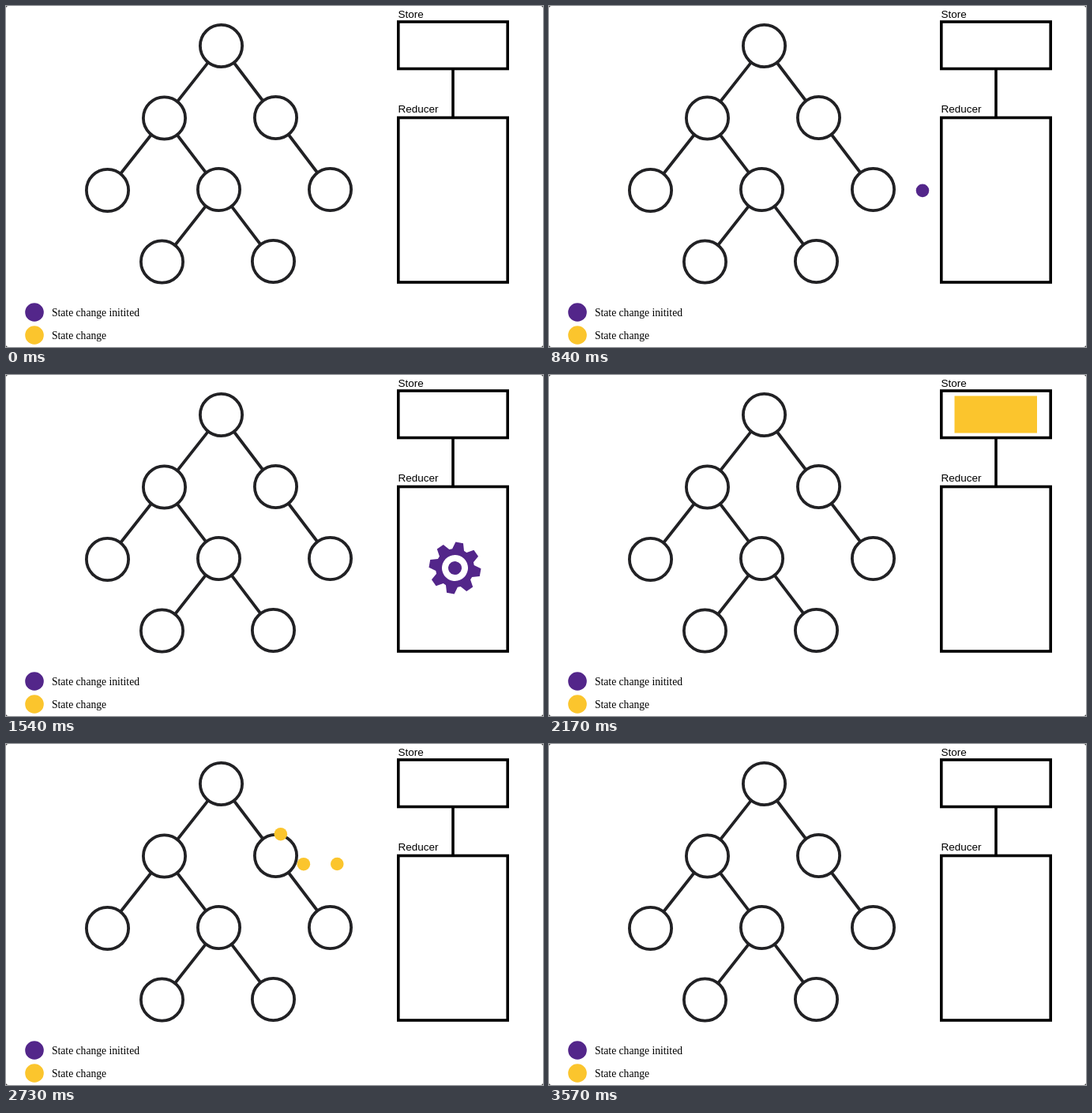
An HTML page for the animation above (3780 ms loop, 680 by 432 pixels).

```html
<!DOCTYPE html>
<html lang="en">
<head>
<meta charset="utf-8">
<style>
  html, body { margin: 0; width: 100%; height: 100%; overflow: hidden; background: #222; }
  svg { display: block; background: #fff; border-radius: 3px; }
  .tree { stroke: #212124; stroke-width: 3.8; fill: #fff; }
  .box { stroke: #000; stroke-width: 3.6; fill: none; }
  .label { font: 13.5px "Liberation Sans", Arial, sans-serif; }
  .legend { font: 13.6px "Liberation Serif", Times, serif; }
  .purple { fill: #53268a; }
  .yellow { fill: #fbc52d; }
</style>
</head>
<body>
<svg width="680" height="432" viewBox="0 0 680 432">
  <g id="tree" class="tree"></g>
  <g class="box">
    <path d="M566 80V141"/>
    <rect x="496.8" y="20" width="138.4" height="59.5"/>
    <rect x="496.8" y="141.5" width="138.4" height="208.5"/>
  </g>
  <g class="label">
    <text x="496.5" y="15">Store</text>
    <text x="496.5" y="135">Reducer</text>
  </g>
  <g class="legend">
    <circle class="purple" cx="36" cy="388" r="11.8"/>
    <circle class="yellow" cx="36" cy="417" r="11.8"/>
    <text x="58" y="393">State change initited</text>
    <text x="58" y="422">State change</text>
  </g>
  <g id="gear">
    <path id="cog" class="purple"/>
    <circle r="16.5" fill="#fff"/>
    <circle class="purple" r="8.5"/>
  </g>
  <rect id="fill" class="yellow" x="513.5" y="26.5" width="104.5" height="47"/>
  <g id="dots"></g>
</svg>
<script>
const STEP = 70, LOOP = 3780;
const $ = id => document.getElementById(id);

function add(parent, tag, attrs) {
  const el = document.createElementNS('http://www.w3.org/2000/svg', tag);
  for (const key in attrs) el.setAttribute(key, attrs[key]);
  return parent.appendChild(el);
}

const nodes = [
  [272.5, 50.5], [200.5, 142], [341.5, 141.5], [128.5, 233.5],
  [269.5, 232.5], [410.5, 232.5], [197.5, 324], [338.5, 323.5]
];
const edges = [[0, 1], [0, 2], [1, 3], [1, 4], [2, 5], [4, 6], [4, 7]];
for (const [a, b] of edges) add($('tree'), 'path', { d: `M${nodes[a]}L${nodes[b]}` });
for (const [cx, cy] of nodes) add($('tree'), 'circle', { cx, cy, r: 26.6 });

// Eight tapered teeth: root, tip, tip, root
const outline = [];
for (let i = 0; i < 8; i++) {
  for (const [offset, r] of [[-18, 24.5], [-8.5, 33], [8.5, 33], [18, 24.5]]) {
    const a = (i * 45 + offset) * Math.PI / 180;
    outline.push([r * Math.sin(a), -r * Math.cos(a)]);
  }
}
$('cog').setAttribute('d', `M${outline.join('L')}Z`);

const makeDot = (color, start, end, from, to) =>
  ({ el: add($('dots'), 'circle', { class: color, r: 8.3 }), start, end, from, to });
const dots = [
  makeDot('purple', 140, 980, [410.5, 233], [485.5, 234]),
  makeDot('yellow', 2380, 3220, [504.5, 29], nodes[3]),
  makeDot('yellow', 2380, 3220, [505, 29.5], nodes[6]),
  makeDot('yellow', 2380, 3220, [477, 29.5], nodes[7])
];

function show(el, t, start, end) {
  el.style.display = t >= start && t < end ? '' : 'none';
}

function draw(now) {
  const t = Math.min(Math.floor(now % LOOP / STEP) * STEP, 3570);
  for (const { el, start, end, from, to } of dots) {
    const f = (t - start) / (end - start);
    const [x, y] = from.map((v, i) => v + (to[i] - v) * f);
    el.setAttribute('transform', `translate(${x} ${y})`);
    show(el, t, start, end);
  }
  const angle = (t - 980) / 840 * 360 - 5;
  $('gear').setAttribute('transform', `translate(568.5 244.5) rotate(${angle})`);
  show($('gear'), t, 980, 1750);
  show($('fill'), t, 1750, 2380);
}

let origin;
function tick(now) {
  origin ??= now;
  draw(now - origin);
  requestAnimationFrame(tick);
}
draw(0);
requestAnimationFrame(tick);
</script>
</body>
</html>
```
